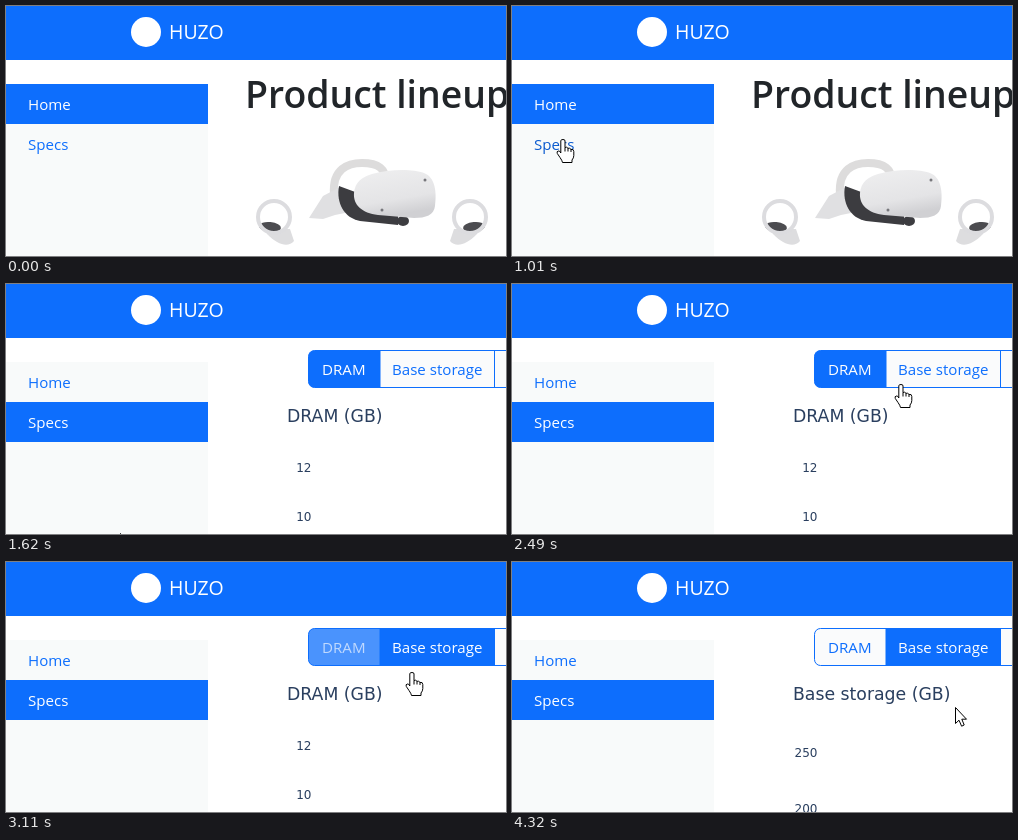
Animation, 500 px wide and 250 px high, one loop 4.39 s. Source, as an HTML page:

```html
<!DOCTYPE html>
<html lang="en">
<head>
<meta charset="utf-8">
<title>Headset specs</title>
<style>
html, body { margin: 0; width: 100%; height: 100%; overflow: hidden; background: #fff; }
svg { display: block; width: 100vw; height: 100vh; }
text { font: 15.1px "Open Sans", "Noto Sans", sans-serif; }
#brand { font-size: 19.5px; fill: #fff; }
#heading { font-size: 37.4px; font-weight: 600; fill: #212529; }
#chart text { font: 12px "DejaVu Sans", sans-serif; fill: #2a3f5f; text-anchor: end; }
#chart #title { font-size: 17.3px; text-anchor: start; }
#arrow, #hand { fill: #fff; stroke: #000; stroke-linejoin: round; }
</style>
</head>
<body>
<svg viewBox="0 0 500 250">
  <defs>
    <linearGradient id="shell" x2=".3" y2="1">
      <stop stop-color="#efeff0"/><stop offset=".7" stop-color="#e4e4e6"/><stop offset="1" stop-color="#d0d0d3"/>
    </linearGradient>
    <g id="controller">
      <path d="M260 223L284 223 288 235C282 242 272 239 261 228Z" fill="#dddddf"/>
      <ellipse cx="264" cy="221" rx="11" ry="5" transform="rotate(6 264 221)" fill="#4c4c50"/>
      <ellipse cx="268" cy="211" rx="16" ry="16" fill="none" stroke="#dcdcdf" stroke-width="4"/>
    </g>
  </defs>

  <rect width="500" height="54" fill="#0d6efd"/>
  <circle cx="140" cy="26" r="15" fill="#fff"/>
  <text id="brand" x="163" y="33">HUZO</text>

  <rect y="78" width="202" height="172" fill="#f8fafa"/>
  <rect id="homeBg" y="78" width="202" height="40"/>
  <rect id="specsBg" y="118" width="202" height="40"/>
  <text id="home" x="22" y="104">Home</text>
  <text id="specs" x="22" y="144">Specs</text>

  <g id="products">
    <text id="heading" x="239" y="102">Product lineup</text>
    <path d="M328 188C326 163 342 157 356 157 372 157 381 163 379 176" fill="none" stroke="#dddcdc" stroke-width="8"/>
    <path d="M303 212L317 190 334 181 344 206 329 209 317 213Z" fill="#e0e0e2"/>
    <path d="M333 180C330 197 338 212 354 215L392 219V208L360 190Z" fill="#3c3c40"/>
    <ellipse cx="397" cy="215" rx="6" ry="5" fill="#3c3c40"/>
    <path d="M366 168C384 163 407 163 418 167 429 171 431 186 429 200 428 209 420 212 408 212L372 209C356 207 347 199 348 187 349 176 356 171 366 168Z" fill="url(#shell)"/>
    <g fill="#77777c"><circle cx="376" cy="204" r="1.5"/><circle cx="419" cy="174" r="1.5"/></g>
    <use href="#controller"/>
    <use href="#controller" transform="translate(732 0) scale(-1 1)"/>
  </g>

  <g id="details">
    <rect x="302.5" y="66.5" width="220" height="37" rx="6" fill="#fafbfc"/>
    <path id="dramBg" d="M374 66.5H308.5A6 6 0 0 0 302.5 72.5V97.5A6 6 0 0 0 308.5 103.5H374Z"/>
    <rect id="baseBg" x="374" y="66.5" width="114" height="37"/>
    <g fill="none" stroke="#0d6efd">
      <rect x="302.5" y="66.5" width="220" height="37" rx="6"/>
      <path d="M374 66V104M488.5 66V104"/>
    </g>
    <text id="dram" x="316" y="91">DRAM</text>
    <text id="base" x="386" y="91">Base storage</text>
    <g id="chart">
      <text id="title" x="281" y="138"></text>
      <text id="tickA" x="305.5"></text>
      <text id="tickB" x="305.5"></text>
    </g>
  </g>

  <g id="pointer">
    <path id="arrow" d="M.5 .5V16.5L4 13.2 6.6 19.2 9.2 18 6.8 12.2H11.5Z"/>
    <path id="hand" d="M-2.2 1.8Q-2.2 .5 0 .5T2 2V8.5Q3.6 7.5 5 9.3 6.6 8.6 8 10.4 10.8 9.8 10.8 12.5V16.5Q10.8 19 9 21V23.5H-.5Q-.8 21.5-3 18.5L-5.7 14.5Q-6.6 12.4-4.8 12T-2.2 14ZM2 8.5V12.5M5 9.3V12.5M8 10.4V13"/>
  </g>
</svg>
<script>
const LOOP = 4390, STEP = 70, FADE = 150;
const BLUE = [13, 110, 253], DARK = [10, 88, 202], WHITE = [255, 255, 255];
const PANEL = [248, 250, 250], PALE = [250, 251, 252];

// Pointer strokes; it rests at the end of each, some lie below the stage.
const strokes = [
  { start: 320, end: 810, from: [1, 241], to: [31, 170] },
  { start: 860, end: 1010, from: [31, 170], to: [51, 133] },
  { start: 1400, end: 1620, from: [51, 133], to: [120, 260] },
  { start: 2270, end: 2490, from: [150, 240], to: [389, 100] },
  { start: 2560, end: 2900, from: [389, 100], to: [401, 78] },
  { start: 3110, end: 3320, from: [406, 109], to: [370, 260] },
  { start: 4040, end: 4310, from: [294, 240], to: [443, 145] }
];

const el = id => document.getElementById(id);
const fill = (id, rgb) => el(id).setAttribute("fill", `rgb(${rgb})`);
const show = (id, on) => el(id).setAttribute("visibility", on ? "visible" : "hidden");
const mix = (a, b, p) => a.map((v, i) => Math.round(v + (b[i] - v) * p));

// Eased progress from 0 to 1
function ease(t, start, length = FADE) {
  const p = Math.min(1, Math.max(0, (t - start) / length));
  return p * p * (3 - 2 * p);
}

// The screen refreshes in even steps.
const snap = t => Math.floor((t - 25) / STEP) * STEP + 40;

function drawPointer(t) {
  const s = strokes.findLast(s => t >= s.start);
  show("pointer", s);
  if (!s) return show("arrow", false), show("hand", false);
  const [x, y] = mix(s.from, s.to, ease(t, s.start, s.end - s.start));
  const onNav = x < 202 && y > 118 && y < 158;
  const onButton = x > 374 && y > 66 && y < 112;
  show("hand", onNav || onButton);
  show("arrow", !onNav && !onButton);
  el("pointer").setAttribute("transform", `translate(${x} ${y})`);
}

function label(id, text, y) {
  el(id).textContent = text;
  if (y) el(id).setAttribute("y", y);
}

function draw(t) {
  const nav = ease(t, 1270), hover = ease(t, 900);
  fill("homeBg", mix(BLUE, PANEL, nav));
  fill("home", mix(WHITE, BLUE, nav));
  fill("specsBg", mix(PANEL, BLUE, nav));
  fill("specs", mix(mix(BLUE, DARK, hover), WHITE, nav));

  const onSpecs = t >= 1480;
  show("products", !onSpecs);
  show("details", onSpecs);

  const base = ease(t, 2490), dram = ease(t, 3070);
  fill("dramBg", mix(BLUE, PALE, dram));
  fill("dram", mix(WHITE, BLUE, dram));
  fill("baseBg", mix(PALE, BLUE, base));
  fill("base", mix(BLUE, WHITE, base));

  const storage = t >= 3250;
  label("title", storage ? "Base storage (GB)" : "DRAM (GB)");
  label("tickA", storage ? "250" : "12", storage ? 195 : 188);
  label("tickB", storage ? "200" : "10", storage ? 251 : 237);
  drawPointer(t);
}

function tick() {
  draw(snap(performance.now() % LOOP));
  requestAnimationFrame(tick);
}
tick();
</script>
</body>
</html>
```
